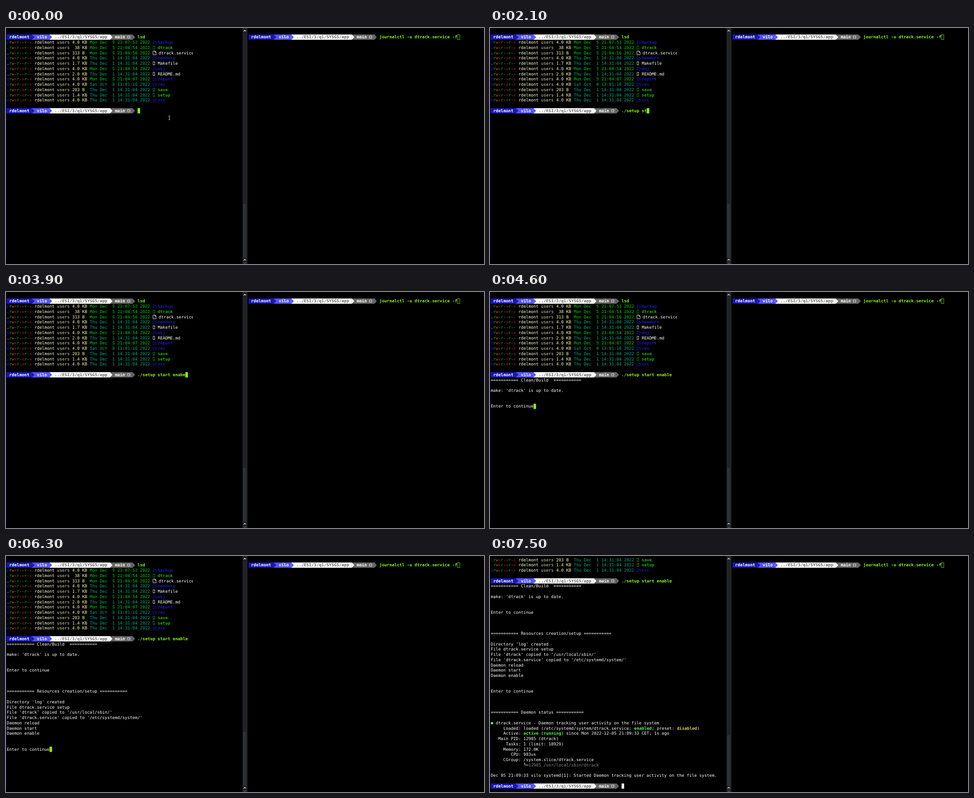
An HTML page with a canvas for the animation above (8 s loop, 1063 by 527 pixels).

```html
<!DOCTYPE html>
<html lang="en">
<head>
<meta charset="utf-8">
<title>Terminal</title>
<style>
html, body { margin: 0; height: 100%; overflow: hidden; background: #000; }
canvas { display: block; }
</style>
</head>
<body>
<canvas id="stage" width="1063" height="527"></canvas>
<script>
const ctx = document.getElementById('stage').getContext('2d');
const LOOP = 8000, CELL = 5.595, LINE = 11.75, TOP = 2.75, LEFT = 1.68, RIGHT = 539.4;
const WHITE = '#fff', BLUE = '#1818b2', GREEN = '#18b218', LIME = '#87ff00',
      GREY = '#686868', VIOLET = '#5454ff', OK = '#54ff54', DIM = '#8a8a8a';
const USER = 'rdelmont', HOST = 'vilo';

let origin = LEFT, scroll = 0;
const colX = col => origin + col * CELL;
const rowY = row => TOP + (row - scroll) * LINE;

function box(x, y, w, h, color) {
  ctx.fillStyle = color;
  ctx.fillRect(x, y, w, h);
}

function line(color, width, ...points) {
  ctx.strokeStyle = color;
  ctx.lineWidth = width;
  ctx.beginPath();
  points.forEach(([x, y]) => ctx.lineTo(x, y));
  ctx.stroke();
}

function frame(x, y, w, h, color) {
  ctx.strokeStyle = color;
  ctx.lineWidth = 0.8;
  ctx.strokeRect(x, y, w, h);
}

function put(row, col, text, color = WHITE, bold = false) {
  ctx.font = (bold ? 'bold ' : '') + '9.294px "DejaVu Sans Mono", monospace';
  ctx.fillStyle = color;
  ctx.fillText(text, colX(col), rowY(row) + 8.8);
}

// Writes [text, color, bold] runs one after another.
function runs(row, col, list) {
  for (const [text, color, bold] of list) {
    put(row, col, text, color, bold);
    col += text.length;
  }
}

const cursor = (row, col, color) => box(colX(col), rowY(row), CELL, LINE, color);

function prompt(row, command) {
  const y = rowY(row);
  const parts = [
    [0, 10, BLUE, USER, WHITE], [11, 17, VIOLET, HOST, WHITE],
    [18, 41, WHITE, '../ESI/3/q1/SYSG5/app', GREY], [42, 50, GREY, 'main', WHITE]
  ];
  parts.forEach(([from, to, fill, text, color], i) => {
    const x = colX(to), start = i ? from - 1 : from;
    box(colX(start), y, x - colX(start), LINE, fill);
    if (i) arrow(colX(start), y, parts[i - 1][2]);
    arrow(x, y, fill);
    put(row, from + 1, text, color, true);
  });
  frame(colX(48) + 0.4, y + 3.4, 4.8, 4.8, WHITE);
  put(row, 52, command, LIME, true);
}

function arrow(x, y, color) {
  ctx.fillStyle = color;
  ctx.beginPath();
  ctx.moveTo(x, y);
  ctx.lineTo(x + CELL, y + LINE / 2);
  ctx.lineTo(x, y + LINE);
  ctx.fill();
}

const FILES = [
  ['drwxr-xr-x', '4.0 KB', 'Mon Dec  5 21:07:52', 'backup'],
  ['.rwxr-xr-x', ' 38 KB', 'Mon Dec  5 21:04:54', 'dtrack'],
  ['.rw-r--r--', '313 B ', 'Mon Dec  5 21:04:56', 'dtrack.service'],
  ['drwxr-xr-x', '4.0 KB', 'Thu Dec  1 14:31:04', 'headers'],
  ['.rw-r--r--', '1.7 KB', 'Thu Dec  1 14:31:04', 'Makefile'],
  ['drwxr-xr-x', '4.0 KB', 'Mon Dec  5 21:04:54', 'obj'],
  ['.rw-r--r--', '2.0 KB', 'Thu Dec  1 14:31:04', 'README.md'],
  ['drwxr-xr-x', '4.0 KB', 'Mon Dec  5 21:04:07', 'report'],
  ['drwxr-xr-x', '4.0 KB', 'Sat Oct  8 13:01:16', 'res'],
  ['.rwxr-xr-x', '203 B ', 'Thu Dec  1 14:31:04', 'save'],
  ['.rwxr-xr-x', '1.4 KB', 'Thu Dec  1 14:31:04', 'setup'],
  ['drwxr-xr-x', '4.0 KB', 'Thu Dec  1 14:31:04', 'src']
];
const MODE = { r: GREEN, w: '#b26818', x: '#b21818', '-': DIM };

function icon(row, mode, name, color) {
  const x = colX(58), y = rowY(row);
  if (mode[0] === 'd') {
    line(color, 0.9, [x + 1.5, y + 9], [x + 0.6, y + 9], [x + 0.6, y + 2.4], [x + 3.4, y + 2.4],
      [x + 4.4, y + 3.6], [x + 7.6, y + 3.6], [x + 7.6, y + 5.4]);
    line(color, 0.9, [x + 1, y + 9], [x + 3, y + 5.4], [x + 10, y + 5.4], [x + 8, y + 9], [x + 1, y + 9]);
  } else if (name === 'dtrack.service') {
    line(color, 0.9, [x + 5, y + 1.6], [x + 0.6, y + 1.6], [x + 0.6, y + 10], [x + 7.6, y + 10],
      [x + 7.6, y + 4.2], [x + 5, y + 1.6], [x + 5, y + 4.2], [x + 7.6, y + 4.2]);
  } else {
    frame(x + 0.9, y + 2.2, 3.6, 7, color);
  }
}

function listing() {
  FILES.forEach(([mode, size, date, name], i) => {
    const row = i + 2, folder = mode[0] === 'd', program = mode[3] === 'x';
    const color = folder ? BLUE : program ? GREEN : WHITE;
    [...mode].forEach((c, col) => put(row, col, c, col ? MODE[c] : color));
    runs(row, 11, [[USER + ' ', '#ffffd7'], ['users ', '#d7d7af'], [size + ' ', '#ffffaf'],
      [date + ' 2022', date.startsWith('Mon') ? '#00d700' : '#00af87']]);
    icon(row, mode, name, color);
    ctx.save();
    ctx.beginPath();
    ctx.rect(0, 0, colX(74), 527);
    ctx.clip();
    put(row, name === 'dtrack.service' ? 60.4 : 60, name, color, program);
    ctx.restore();
  });
}

const BAR = '='.repeat(11);
// [time, row, text]
const OUTPUT = [
  [4600, 16, BAR + ' Clean/Build  ' + BAR],
  [4600, 18, "make: 'dtrack' is up to date."],
  [4600, 21, 'Enter to continue'],
  [5600, 25, BAR + ' Resources creation/setup ' + BAR],
  [5600, 27, "Directory 'log' created"],
  [5600, 28, 'File dtrack.service setup'],
  [5600, 29, "File 'dtrack' copied to '/usr/local/sbin/'"],
  [5600, 30, "File 'dtrack.service' copied to '/etc/systemd/system/'"],
  [5900, 31, 'Daemon reload'],
  [5900, 32, 'Daemon start'],
  [6300, 33, 'Daemon enable'],
  [6300, 36, 'Enter to continue'],
  [7200, 40, BAR + ' Daemon status ' + BAR],
  [7200, 42, '  dtrack.service - Daemon tracking user activity on the file system'],
  [7200, 45, '   Main PID: 12985 (dtrack)'],
  [7200, 46, '      Tasks: 1 (limit: 18929)'],
  [7200, 47, '     Memory: 172.0K'],
  [7200, 48, '        CPU: 983us'],
  [7200, 49, '     CGroup: /system.slice/dtrack.service'],
  [7200, 52, `Dec 05 21:09:33 ${HOST} systemd[1]: Started Daemon tracking user activity on the file system.`]
];

function status() {
  ctx.fillStyle = OK;
  ctx.beginPath();
  ctx.arc(colX(0) + 2.8, rowY(42) + 6.2, 2.7, 0, 7);
  ctx.fill();
  runs(43, 5, [['Loaded: loaded (/etc/systemd/system/dtrack.service; '], ['enabled', OK, true],
    ['; preset: '], ['disabled', '#d7d75f', true], [')']]);
  runs(44, 5, [['Active: '], ['active (running)', OK, true], [' since Mon 2022-12-05 21:09:33 CET; 1s ago']]);
  const x = colX(13) + 2.8, y = rowY(50);
  line(WHITE, 1, [x, y], [x, y + 5.9], [colX(15), y + 5.9]);
  put(50, 15, '12985 /usr/local/sbin/dtrack', DIM);
}

// "<" is a backspace; each key has its own time in tenths of a second.
const KEYS = './setup start enabel<<le';
const KEY_TIMES = [2, 6, 9, 11, 13, 14, 16, 17, 20, 21, 22, 23, 24, 28, 28, 29, 31, 32, 34, 36, 39, 40, 42, 43];

function typed(t) {
  let text = '';
  KEY_TIMES.forEach((at, i) => {
    if (t >= at * 100) text = KEYS[i] === '<' ? text.slice(0, -1) : text + KEYS[i];
  });
  return text;
}

function drawCursor(t, command) {
  if (t < 4600) cursor(15, 52 + command.length, LIME);
  else if (t < 5600) cursor(21, 17, LIME);
  else if (t < 5900) cursor(31, 0, LIME);
  else if (t < 6300) cursor(33, 0, LIME);
  else if (t < 7200) cursor(36, 17, LIME);
  else if (t < 7300) cursor(53, 0, WHITE);
  else cursor(54, 52, WHITE);
}

function scrollbar(t) {
  box(526, 0, 11, 527, '#212427');
  const top = t < 7200 ? 393 : 401;
  box(528, top, 5.5, 512 - top, '#3a3f44');
  box(528.7, top + 0.7, 4.1, 510.6 - top, '#2c3136');
  for (const y of [7.5, 519]) line('#fcfcfc', 1.1, [528.6, y], [531, y - 2.5], [533.4, y]);
  line('#777b7e', 1, [528.6, 523.5], [531, 526], [533.4, 523.5]);
}

function leftPane(t) {
  origin = LEFT;
  scroll = t < 7200 ? 0 : t < 7300 ? 10 : 11;
  ctx.save();
  ctx.beginPath();
  ctx.rect(0, TOP, 526, 44 * LINE);
  ctx.clip();
  const fresh = (scroll || 44) * LINE, bright = t >= 7200 && t < 7500;
  box(0, TOP + 44 * LINE - fresh, 1, fresh, bright ? '#1818c8' : '#06066a');
  const command = typed(t);
  prompt(1, 'lsd');
  listing();
  prompt(15, command);
  for (const [at, row, text] of OUTPUT) if (t >= at) put(row, 0, text);
  if (t >= 7200) status();
  if (t >= 7300) prompt(54, '');
  drawCursor(t, command);
  ctx.restore();
  if (t < 300) {
    line('#f0b860', 1.2, [363.2, 196.5], [363.2, 204.7]);
    for (const y of [196.5, 204.7]) line('#f0b860', 1, [361.4, y], [365, y]);
  }
}

function rightPane() {
  origin = RIGHT;
  scroll = 0;
  prompt(1, 'journalctl -u dtrack.service -f');
  frame(colX(83) + 0.3, rowY(1) + 0.5, CELL - 0.6, LINE - 1, LIME);
}

function draw() {
  const t = performance.now() % LOOP;
  ctx.textRendering = 'geometricPrecision';
  box(0, 0, 1063, 527, '#000');
  leftPane(t);
  scrollbar(t);
  rightPane();
  requestAnimationFrame(draw);
}
draw();
</script>
</body>
</html>
```
